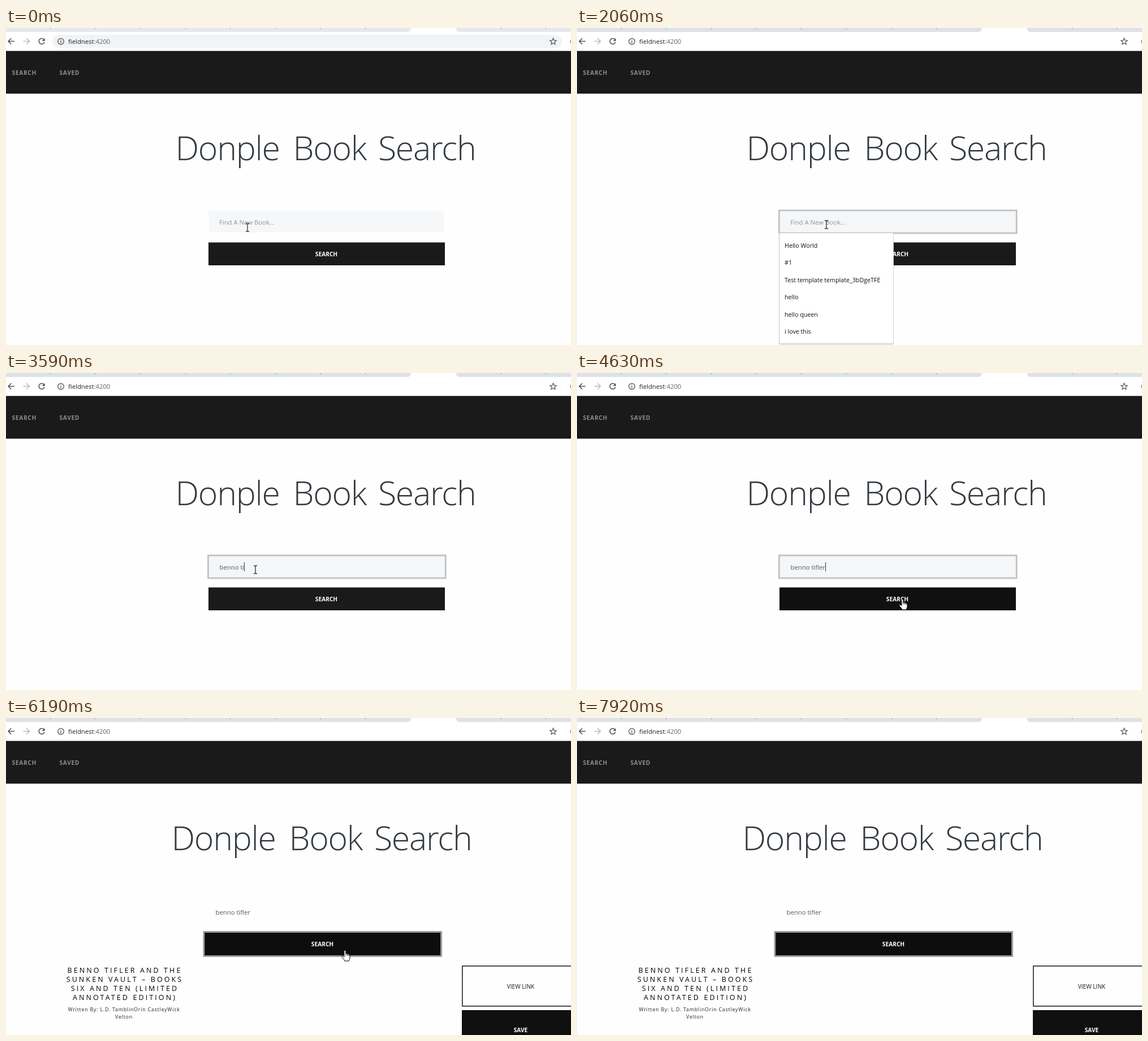
An HTML page for the animation above (8.94 s loop, 999 by 561 pixels).

```html
<!DOCTYPE html>
<html lang="en">
<head>
<meta charset="utf-8">
<title>Book search</title>
<style>
  html, body { margin: 0; width: 100%; height: 100%; overflow: hidden; background: #fefefe; }
  svg { display: block; width: 100vw; height: 100vh; }
  text { font-family: "Open Sans", "Noto Sans", sans-serif; white-space: pre; }
  .title { font-size: 59px; font-weight: 300; letter-spacing: -1.3px; fill: #343a40; }
  .nav { font-size: 10.2px; font-weight: 700; letter-spacing: .7px; fill: #8e8e8e; }
  .field { font-size: 11.3px; }
  .option { font-size: 10.7px; fill: #111; }
  .button { font-size: 10.2px; font-weight: 700; fill: #fff; text-anchor: middle; }
  .link { font-size: 10.2px; font-weight: 500; fill: #15181b; text-anchor: middle; }
  .book { font-size: 12.5px; font-weight: 500; letter-spacing: 3.1px; fill: #000; text-anchor: middle; }
  .author { font-size: 8.8px; letter-spacing: .8px; fill: #222; text-anchor: middle; }
  .icon { fill: none; stroke: #505357; stroke-width: 1.6; }
</style>
</head>
<body>
<svg viewBox="0 0 999 561" preserveAspectRatio="none">
  <rect width="999" height="561" fill="#fefefe"/>

  <!-- browser bar -->
  <rect width="999" height="41" fill="#fff"/>
  <path id="tabs" d="M0 0H716V1Q715 7 709 7H0ZM796 0H999V7H803Q796 7 796 1Z"/>
  <g id="ticks" fill="#8f9397"></g>
  <rect id="pill" x="82" y="12" width="901" height="23.5" rx="11.75" fill="#f1f3f4"/>
  <path class="icon" d="M15 23.5H4.2M9.3 18.2L4 23.5L9.3 28.8"/>
  <path class="icon" style="stroke:#babcbe" d="M30.5 23.5H41.3M36.2 18.2L41.5 23.5L36.2 28.8"/>
  <path class="icon" d="M67 20.2A5 5 0 1 0 68 24.8"/>
  <path d="M68.6 18V23H63.6Z" fill="#505357"/>
  <circle class="icon" style="stroke-width:1.3" cx="97" cy="23.7" r="5.3"/>
  <path d="M96.3 20.6H97.7V22H96.3ZM96.3 23H97.7V26.8H96.3Z" fill="#505357"/>
  <text x="110" y="28" style="font-size:11.3px" fill="#202124">fieldnest<tspan fill="#5f6368">:4200</tspan></text>
  <path id="star" class="icon" style="stroke-width:1.2"/>
  <circle cx="1001.5" cy="24" r="4" fill="#e2557f"/>

  <!-- page header -->
  <rect y="40.6" width="999" height="75.6" fill="#1a1a1a"/>
  <text class="nav" x="10.5" y="83">SEARCH</text>
  <text class="nav" x="94.5" y="83">SAVED</text>

  <!-- form -->
  <g id="boxes">
    <rect id="input" x="358.5" y="324" width="416" height="38" fill="#f5f7f9"/>
    <rect id="inputRing" x="357.4" y="322.8" width="419.8" height="40.2" fill="#f5f6f8" stroke="#c1c2c3" stroke-width="2.8"/>
    <rect id="button" x="358" y="379.5" width="418" height="40.5"/>
    <rect id="buttonRing" x="357.4" y="378.4" width="419.8" height="43" fill="none" stroke="#9a9a9a" stroke-width="2.8"/>
  </g>
  <g id="labels">
    <text class="title" y="234"><tspan x="299.5">Donple</tspan><tspan x="507.5">Book</tspan><tspan x="658">Search</tspan></text>
    <text id="hint" class="field" x="377" y="347.5" fill="#8e969b">Find A New Book...</text>
    <text id="typed" class="field" x="377.5" y="347.5" fill="#555b60"></text>
    <text class="button" x="566.5" y="404">SEARCH</text>
  </g>
  <rect id="caret" y="335" width="1" height="16" fill="#333"/>
  <g id="menu">
    <path d="M357 363H560V557Q560 560 557 560H360Q357 560 357 557Z" fill="#c4c4c4"/>
    <path d="M358 363H559.3V556Q559.3 558.4 557 558.4H360Q358 558.4 358 556Z" fill="#fff"/>
  </g>

  <!-- result -->
  <g id="result">
    <g id="book"></g>
    <rect x="806.9" y="438.9" width="210" height="71" fill="#fefefe" stroke="#343a40" stroke-width="1.8"/>
    <text class="link" x="910" y="478.5">VIEW LINK</text>
    <rect x="806" y="517" width="210" height="60" fill="#0f0f0f"/>
    <text class="button" x="910" y="556">SAVE</text>
  </g>

  <!-- pointers -->
  <path id="beam" d="M-3 -7H-1L0 -6L1 -7H3M0 -6V6M-3 7H-1L0 6L1 7H3" fill="none" stroke="#333" stroke-width="1.3"/>
  <path id="hand" fill="#fff" stroke="#000" stroke-width="1" stroke-linejoin="round"
    d="M-1.5 12V1.5Q-1.5 0 0 0T1.5 1.5V6Q3.5 5 4.3 6.8Q6 6 6.8 7.6Q8.6 7.2 8.6 9.2V13Q8.6 16 7 17.5V19H-1V17.5L-5.3 12Q-6 10.5 -4.8 9.8Q-3.5 9.3 -1.5 12ZM1.5 6V9.5M4.3 6.8V9.8M6.8 7.6V10"/>
  <path id="arrow" fill="#fff" stroke="#000" stroke-width="1" stroke-linejoin="round"
    d="M0 0V15.5L3.6 12.1L6 17.8L8.4 16.8L6 11.3H10.8Z"/>
</svg>
<script>
const LOOP = 8940;
const QUERY = "benno tifler";
const $ = id => document.getElementById(id);
const show = (id, on) => { $(id).style.display = on ? "" : "none"; };
const move = (id, x, y) => $(id).setAttribute("transform", `translate(${x} ${y})`);
const fill = (id, color) => $(id).setAttribute("fill", color);
const mix = (a, b, k) => a + (b - a) * k;

// Fraction of n evenly spaced steps, the first at a and the last at b.
const steps = (t, a, b, n) =>
  t < a ? 0 : Math.min(n, Math.floor((t - a) / ((b - a) / (n - 1)) + 1.001)) / n;

function add(parent, tag, attrs, content = "") {
  const el = document.createElementNS("http://www.w3.org/2000/svg", tag);
  for (const k in attrs) el.setAttribute(k, attrs[k]);
  el.textContent = content;
  $(parent).append(el);
}

for (let i = 0; i < 12; i++) {
  const x = Math.round(77.5 + i * 79.7);
  if (x < 700 || x > 800) add("ticks", "rect", { x, y: 0, width: 1, height: 2 });
}

$("star").setAttribute("d", "M" + Array.from({ length: 10 }, (_, i) => {
  const r = i % 2 ? 2.7 : 6, a = i * Math.PI / 5;
  return `${(967.5 + r * Math.sin(a)).toFixed(2)} ${(24 - r * Math.cos(a)).toFixed(2)}`;
}).join("L") + "Z");

["Hello World", "#1", "Test template template_3bDgeTFE", "hello", "hello queen", "i love this"]
  .forEach((s, i) => add("menu", "text", { class: "option", x: 367, y: 389 + i * 30.4 }, s));

["BENNO TIFLER AND THE", "SUNKEN VAULT – BOOKS", "SIX AND TEN (LIMITED", "ANNOTATED EDITION)"]
  .forEach((s, i) => add("book", "text", { class: "book", x: 210, y: 451 + i * 16 }, s));
["Written By: L.D. TamblinOrin CastleyWick", "Velton"]
  .forEach((s, i) => add("book", "text", { class: "author", x: 208.5, y: 519 + i * 13 }, s));

// Times at which each letter of the query is typed.
const keys = [2340, 2490, 2770, 2950, 2950, 3130, 3310, 3590, 3760, 3930, 4100, 4280];

function pointer(t) {
  if (t < 4450) {
    const k = steps(t, 980, 1530, 4);
    return ["beam", mix(427, 441, k), mix(353, 348, k)];
  }
  if (t < 4630) return ["beam", 505, 355];
  if (t < 6840) {
    const k = steps(t, 4780, 4910, 2);
    return ["hand", mix(575.4, 599.4, k), mix(400, 411, k)];
  }
  if (t >= 7920) return [];
  const k = steps(t, 6840, 7770, 7), e = k * k * (3 - 2 * k);
  const x = mix(599.4, 915.5, e), y = mix(411, 558, e);
  const hot = y < 422 || (x > 806 && y > 438);
  return [hot ? "hand" : "arrow", x, y];
}

function draw(t) {
  const focus = t >= 430 && t < 5210;
  const clicked = t >= 5210;
  const found = t >= 6190;
  const count = keys.filter(k => t >= k).length;

  fill("tabs", t < 430 ? "#e5e9ec" : "#dee1e6");
  show("pill", t < 430);

  // The page's scrollbar moves the centred form to the left.
  move("boxes", found ? -7.5 : 0, 0);
  move("labels", found ? -7 : 0, 0);
  show("input", !found);
  show("inputRing", focus);
  show("buttonRing", clicked);
  const press = steps(t, 5210, 5480, 3);
  const shade = found ? 13 : t >= 4630 ? Math.round(mix(16, 6, press)) : 26;
  fill("button", `rgb(${shade},${shade},${shade})`);

  show("hint", count === 0);
  $("typed").textContent = QUERY.slice(0, count);
  const blink = t < 2340 ? Math.floor((t - 430) / 550) % 2 === 0 && t < 2060 : t < 4780;
  show("caret", focus && blink);
  $("caret").setAttribute("x", Math.round(378 + (count ? $("typed").getComputedTextLength() - .4 : 0)));

  show("menu", t >= 580 && t < 2340);
  show("result", found);

  const [kind, x, y] = pointer(t);
  for (const id of ["beam", "hand", "arrow"]) {
    show(id, id === kind);
    if (id === kind) move(id, x, y);
  }
}

let start;
function tick(now) {
  start ??= now;
  draw((now - start) % LOOP);
  requestAnimationFrame(tick);
}
draw(0);
requestAnimationFrame(tick);
</script>
</body>
</html>
```
